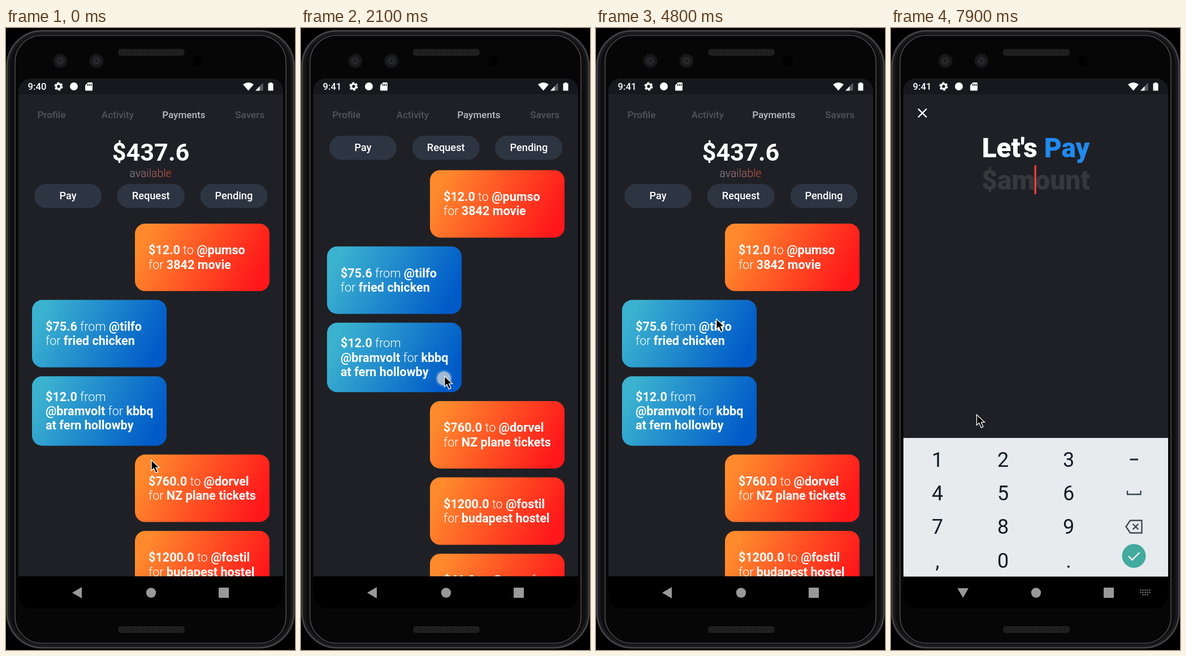
Recreate the animation shown at these times as an HTML page. Size 511x1097 px, loop 8 s.

```html
<!DOCTYPE html>
<html lang="en">
<head>
<meta charset="utf-8">
<title>Payments</title>
<style>
  html, body { margin: 0; width: 100%; height: 100%; overflow: hidden; background: #000; }
  svg { display: block; width: 511px; height: 1097px; font-family: Roboto, sans-serif; }
  text { fill: #fff; white-space: pre; }
  .mid { text-anchor: middle; }
  .tab { font-size: 17.08px; font-weight: 500; }
  .btn { font-size: 18.22px; font-weight: 500; }
  .card { font-size: 21.6px; font-weight: 300; }
  .card .b { font-weight: 700; }
  .title { font-size: 47.8px; font-weight: 900; }
  .key { font-size: 36px; fill: #111c24; }
  .icon { fill: none; stroke: #3c484f; stroke-width: 2.4; }
</style>
</head>
<body>
<svg viewBox="0 0 511 1097" xmlns="http://www.w3.org/2000/svg">
  <defs>
    <linearGradient id="orange" gradientUnits="userSpaceOnUse" x1="0" y1="0" x2="238" y2="119">
      <stop offset=".1" stop-color="#ff8a2d"/><stop offset=".9" stop-color="#ff171a"/>
    </linearGradient>
    <linearGradient id="blue" gradientUnits="userSpaceOnUse" x1="0" y1="0" x2="238" y2="119">
      <stop offset=".1" stop-color="#3bb2d0"/><stop offset=".9" stop-color="#005ac8"/>
    </linearGradient>
    <linearGradient id="warm" gradientUnits="userSpaceOnUse" x1="219" y1="0" x2="292" y2="0">
      <stop offset="0" stop-color="#8c94ab"/><stop offset="1" stop-color="#cc4836"/>
    </linearGradient>
    <linearGradient id="fade" x1="0" y1="0" x2="0" y2="1">
      <stop offset="0" stop-color="#1f2025" stop-opacity=".85"/>
      <stop offset="1" stop-color="#1f2025" stop-opacity="0"/>
    </linearGradient>
    <radialGradient id="glow">
      <stop offset=".72" stop-color="#c6d0d8" stop-opacity=".8"/>
      <stop offset=".78" stop-color="#a8c4dc" stop-opacity=".4"/>
      <stop offset="1" stop-color="#a8c4dc" stop-opacity="0"/>
    </radialGradient>
    <pattern id="mesh" width="4" height="4" patternUnits="userSpaceOnUse">
      <rect width="4" height="4" fill="#1b1b1c"/><rect width="2" height="2" fill="#2a2a2b"/>
    </pattern>
    <clipPath id="screen"><rect x="22" y="89" width="468" height="935" rx="22"/></clipPath>
    <clipPath id="list"><rect x="22" y="183" width="468" height="784"/></clipPath>
    <clipPath id="app"><rect x="22" y="89" width="468" height="878"/></clipPath>
    <g id="lens">
      <circle r="12.5" fill="#161719"/><circle r="8" fill="#1e2023"/>
      <circle r="5" fill="#2c2f33"/><circle r="3" fill="#17191c"/>
    </g>
  </defs>

  <!-- phone body -->
  <rect width="511" height="1097" fill="#000"/>
  <rect x="2" y="5" width="507" height="1088" rx="62" fill="#0e0e0f" stroke="#434345" stroke-width="3"/>
  <rect x="6" y="9" width="499" height="1080" rx="57" fill="none" stroke="#19191b" stroke-width="4"/>
  <rect x="16" y="13" width="479" height="1072" rx="47" fill="#060607" stroke="#4a4a4d" stroke-width="1.6"/>
  <rect x="198" y="37" width="118" height="12" rx="5" fill="url(#mesh)"/>
  <rect x="198" y="1055" width="118" height="12" rx="5" fill="url(#mesh)"/>
  <use href="#lens" x="96" y="58"/>
  <use href="#lens" x="160" y="58"/>
  <circle cx="339" cy="58" r="9" fill="#000"/>

  <g clip-path="url(#screen)">
    <rect x="22" y="89" width="468" height="935" fill="#1f2025"/>
    <g id="tabs"></g>
    <g clip-path="url(#list)">
      <g id="scroller">
        <text class="mid" x="256" y="234" font-size="43.2" font-weight="700">$437.6</text>
        <text class="mid" x="255.5" y="262.5" font-size="19.4" font-weight="300" style="fill:url(#warm)">available</text>
        <g id="cards"></g>
      </g>
      <g id="bar"><rect x="22" y="268" width="468" height="54" fill="url(#fade)"/></g>
    </g>

    <g clip-path="url(#app)">
      <g id="sheet">
        <rect x="22" y="89" width="468" height="880" fill="#1f2025"/>
        <path d="M48 142.5l15 15m0-15l-15 15" stroke="#fff" stroke-width="2.4"/>
        <text class="mid title" x="256" y="227.5">Let's <tspan fill="#208af0">Pay</tspan></text>
        <text class="mid title" x="256" y="284.5" style="fill:#37383c">$amount</text>
        <rect id="caret" x="253.5" y="242" width="3.2" height="51" fill="#f5433f"/>
      </g>
    </g>

    <!-- status bar -->
    <rect x="22" y="89" width="468" height="28" fill="#17181d"/>
    <text id="clock" x="38.5" y="109" font-size="16.8" font-weight="500"></text>
    <g fill="#fff">
      <g fill="none" stroke="#fff">
        <circle cx="93" cy="103" r="4.3" stroke-width="3.2"/>
        <circle cx="93" cy="103" r="6.4" stroke-width="2.4" stroke-dasharray="3.7 3"/>
      </g>
      <circle cx="120" cy="103" r="7"/>
      <path fill-rule="evenodd" d="M145 96h6.5q1.5 0 1.5 1.5v11.5q0 1.5-1.5 1.5h-10q-1.5 0-1.5-1.5v-8zM144 98.5v3.5h1.5v-3.5zM147 98.5v3.5h1.5v-3.5zM150 98.5v3.5h1.5v-3.5z"/>
      <path d="M419 99.5q9.5-7 19 0l-9.5 11z"/>
      <path d="M441 110.5L454.5 96.5V110.5z" fill="#5c5d61"/>
      <path d="M441 110.5l7.5-7.8v7.8z"/>
      <path d="M466 96h4v1.5h2.5v13h-9v-13h2.5z"/>
    </g>

    <!-- navigation bar -->
    <rect x="22" y="967" width="468" height="57" fill="#000"/>
    <g fill="#999">
      <path id="back"/>
      <circle cx="256.5" cy="996" r="8.7"/>
      <rect x="376" y="987" width="18" height="18" rx="1"/>
      <path id="dots" d="M440.5 991.5h18m-18 4h18m-14 4h10" stroke="#999" stroke-width="2" stroke-dasharray="2 2"/>
    </g>

    <g id="keys">
      <rect x="22" y="723" width="468" height="244.5" fill="#e7ebee"/>
      <g class="icon">
        <path d="M422.5 761h14.5" stroke="#111c24" stroke-width="2.8"/>
        <path d="M418 816v6.5h23.5v-6.5"/>
        <path d="M423 868.5h20.5v22h-20.5l-7.5-11zM427.5 874.5l10 10m0-10l-10 10"/>
      </g>
      <circle cx="429.5" cy="931" r="21" fill="#43aaa0"/>
      <path d="M420 931.5l6.5 6.5 13-13" fill="none" stroke="#fff" stroke-width="2.4"/>
    </g>
  </g>

  <circle id="touch" r="16" fill="url(#glow)"/>
  <path id="pointer" d="M0 0V18.5l4.3-4 3.6 8.3 3.6-1.6-3.5-7.9h6z" fill="#000" stroke="#fff" stroke-width="1.3"/>
</svg>
<script>
(() => {
  const NS = 'http://www.w3.org/2000/svg';
  const $ = id => document.getElementById(id);

  function add(parent, tag, attrs, text) {
    const el = document.createElementNS(NS, tag);
    for (const k in attrs) el.setAttribute(k, attrs[k]);
    if (text) el.textContent = text;
    return parent.appendChild(el);
  }

  ['Profile', 'Activity', 'Payments', 'Savers'].forEach((name, i) =>
    add($('tabs'), 'text', {
      class: 'mid tab', x: 80.5 + 116.9 * i, y: 158.8, style: 'fill:' + (i === 2 ? '#bbbcbf' : '#535458')
    }, name));

  ['Pay', 'Request', 'Pending'].forEach((name, i) => {
    const x = 50 + 146.7 * i;
    add($('bar'), 'rect', { x, y: 275, width: 119, height: 42.5, rx: 21.25, fill: '#2d3542' });
    add($('bar'), 'text', { class: 'mid btn', x: x + 59.5, y: 302 }, name);
  });

  // Asterisks toggle bold.
  const payments = [
    ['out', '*$12.0* to *@pumso', 'for *3842 movie'],
    ['in', '*$75.6* from *@tilfo', 'for *fried chicken'],
    ['in', '*$12.0* from', '*@bramvolt* for *kbbq', '*at fern hollowby'],
    ['out', '*$760.0* to *@dorvel', 'for *NZ plane tickets'],
    ['out', '*$1200.0* to *@fostil', 'for *budapest hostel'],
    ['out', '*$46.0* to *@zavo* for', '*kobe beef steak']
  ];
  let cardY = 345;
  for (const [kind, ...lines] of payments) {
    const out = kind === 'out', h = lines.length > 2 ? 122.5 : 119;
    const card = add($('cards'), 'g', { class: 'card', transform: `translate(${out ? 228 : 46} ${cardY})` });
    add(card, 'rect', { width: 238, height: h, rx: 18, fill: out ? 'url(#orange)' : 'url(#blue)' });
    lines.forEach((line, i) => {
      const y = h / 2 + (i - (lines.length - 1) / 2) * 25.3 + 7.5;
      const text = add(card, 'text', { x: 24, y });
      line.split('*').forEach((part, j) => part && add(text, 'tspan', j % 2 ? { class: 'b' } : {}, part));
    });
    cardY += h + 15.6;
  }

  ['123', '456', '789', ',0.'].forEach((row, r) =>
    [...row].forEach((ch, c) =>
      add($('keys'), 'text', { class: 'mid key', x: 82 + 116 * c, y: 773.5 + 59.4 * r }, ch)));

  // Each stop is [time, ...values], joined by straight lines.
  const pointerPath = [
    [0, 257, 762], [900, 255, 745], [1300, 253, 716], [1700, 252.5, 668], [2900, 256, 506],
    [3300, 257, 402], [3900, 258.5, 574], [4200, 258, 606], [4600, 250, 596],
    [5300, 120, 306], [5500, 112.5, 302], [5800, 112.5, 302], [6200, 180, 262],
    [6600, 255, 271], [7000, 255, 271], [7300, 235, 350], [7700, 158, 660], [7900, 151.5, 682]
  ];
  const scrollPath = [[1350, 0], [1700, 40.3], [2800, 189], [3300, 189], [3900, 24.5], [4000, 0]];
  const touchPath = [
    [1200, 0], [1300, 1], [2800, 1], [2900, .4], [3000, 0], [3200, 0], [3300, 1], [4200, 1],
    [4400, 0], [5400, 0], [5500, .6], [5700, .6], [5800, .3], [5900, 0],
    [6600, 0], [6700, .8], [6900, .4], [7000, .15], [7100, 0]
  ];
  const keysPath = [[6800, 120, 0], [6900, 105, .25], [7000, 56, .61], [7100, 13, .92], [7200, 0, 1]];

  function at(path, t) {
    let i = path.findIndex(p => p[0] > t);
    if (i < 0) i = path.length;
    const a = path[Math.max(i - 1, 0)], b = path[Math.min(i, path.length - 1)];
    const f = a === b ? 0 : (t - a[0]) / (b[0] - a[0]);
    return a.slice(1).map((v, k) => v + (b[k + 1] - v) * f);
  }

  const move = (id, x, y) => $(id).setAttribute('transform', `translate(${x} ${y})`);

  function render(t) {
    const [px, py] = at(pointerPath, t);
    const [scroll] = at(scrollPath, t);
    const [keysY, alpha] = at(keysPath, t);
    const rise = Math.min(Math.max((t - 5665) / 500, 0), 1);
    const typing = t >= 6900;

    $('clock').textContent = t < 500 ? '9:40' : '9:41';
    move('scroller', 0, -scroll);
    move('bar', 0, -Math.min(scroll, 85));
    move('sheet', 0, 878 * (1 - rise) ** 3);
    move('keys', 0, keysY);
    $('keys').setAttribute('opacity', alpha);
    $('caret').setAttribute('opacity', typing && (t - 6900) % 1000 < 500 ? 1 : 0);
    $('back').setAttribute('d', typing ? 'M117.5 988h19.5l-9.7 17z' : 'M117 996l17-10v20z');
    $('dots').setAttribute('opacity', typing ? 1 : 0);
    move('pointer', px, py);
    move('touch', px - 1, py + 4);
    $('touch').setAttribute('opacity', at(touchPath, t)[0]);
  }

  const begin = performance.now();
  function tick() {
    // The screen updates ten times a second.
    render(Math.floor(((performance.now() - begin) % 8000) / 100) * 100);
    requestAnimationFrame(tick);
  }
  tick();
})();
</script>
</body>
</html>
```
